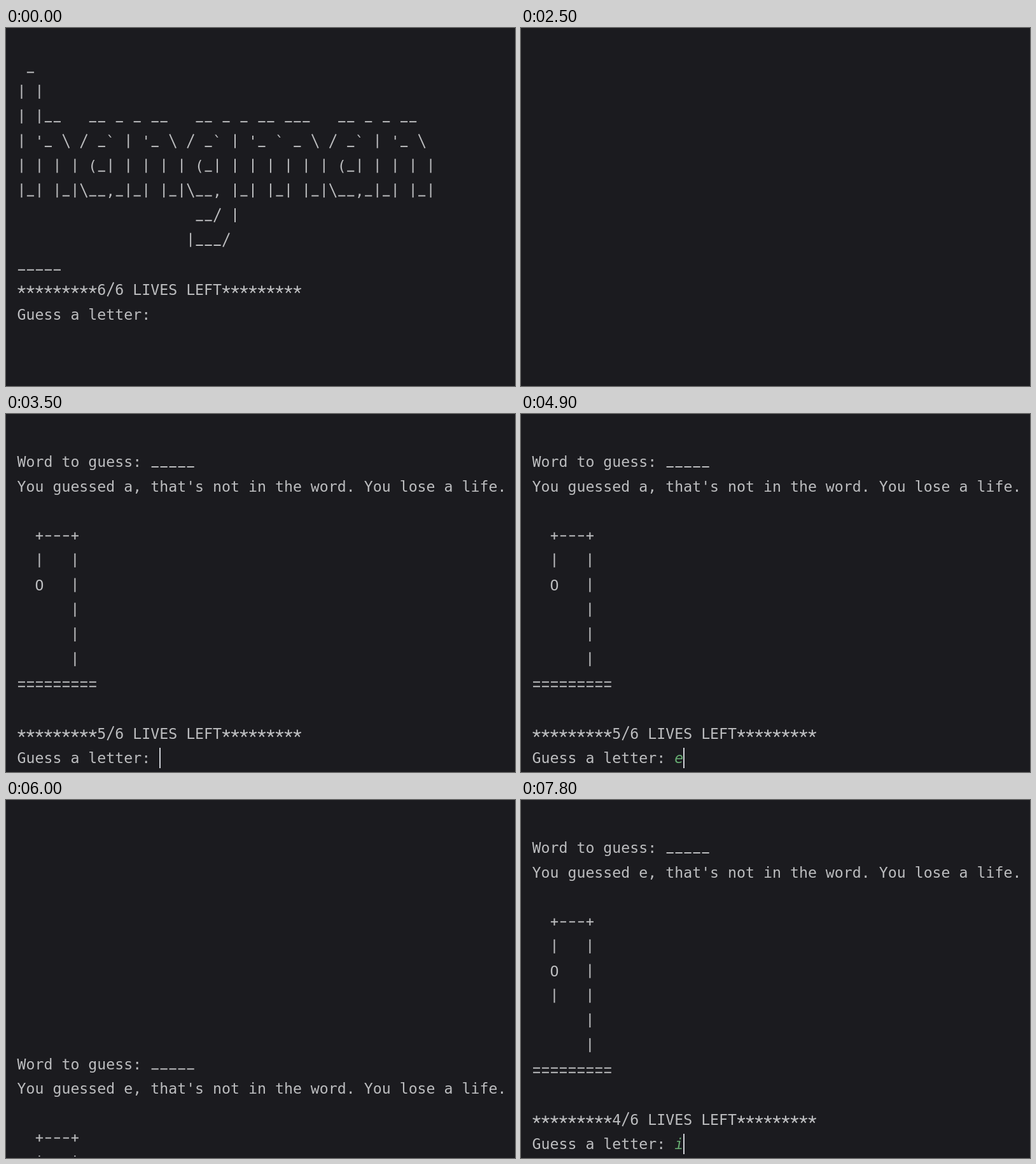
An HTML page with a canvas for the animation above (8000 ms loop, 800 px wide and 562 px high).

```html
<!DOCTYPE html>
<html lang="en">
<head>
<meta charset="utf-8">
<title>Hangman</title>
<style>
html, body { margin: 0; width: 100%; height: 100%; overflow: hidden; background: #1b1b1f; }
canvas { display: block; }
</style>
</head>
<body>
<canvas width="800" height="562"></canvas>
<pre id="art" hidden>
 _
| |
| |__   __ _ _ __   __ _ _ __ ___   __ _ _ __
| '_ \ / _` | '_ \ / _` | '_ ` _ \ / _` | '_ \
| | | | (_| | | | | (_| | | | | | | (_| | | | |
|_| |_|\__,_|_| |_|\__, |_| |_| |_|\__,_|_| |_|
                    __/ |
                   |___/
_____</pre>
<script>
const ctx = document.querySelector('canvas').getContext('2d');
const LEFT = 17.5, CELL = 13.98, ROW = 38.77, LOOP = 8000;
const FONT = '23.2px "DejaVu Sans Mono", monospace';
const GREY = '#bcbdbf', GREEN = '#65a970', CARET = '#ced0d6';

// Line-drawn characters, relative to the centre of their cell
const strokes = {
  '|': 'M0-11V11',
  '_': 'M-5.6 8.3H5.6',
  '/': 'M4.9-11L-4.9 11',
  '\\': 'M-4.9-11L4.9 11',
  '-': 'M-4.6.3H4.6',
  '+': 'M-5.6.3H5.6M0-5.3V5.9',
  '=': 'M-5.5-3H5.5M-5.5 4H5.5',
  '*': 'M0 .5V-5.7M0 .5L5.9-1.4M0 .5L-5.9-1.4M0 .5L3.6 5.5M0 .5L-3.6 5.5'
};
for (const c in strokes) strokes[c] = new Path2D(strokes[c]);

const prompt = lives => [`*********${lives}/6 LIVES LEFT*********`, 'Guess a letter: '];
const round = (letter, lives, body) => [
  'Word to guess: _____',
  `You guessed ${letter}, that's not in the word. You lose a life.`,
  '',
  '  +---+',
  '  |   |',
  '  O   |',
  `  ${body}   |`,
  '      |',
  '      |',
  '=========',
  '',
  ...prompt(lives)
];

const intro = [...document.getElementById('art').textContent.split('\n'), ...prompt(6)];
const second = round('a', 5, ' ');
const third = round('e', 4, '|');
const INTRO_Y = 61.3, LOW_Y = 414, TOP_Y = 74.7;
const OFF = 0, INLINE = 1, BELOW = 2;

// start time, lines, centre of the first row, typed letter, caret
const states = [
  [0, intro, INTRO_Y, '', OFF],
  [100, intro, INTRO_Y, '', INLINE],
  [700, intro, INTRO_Y, '', OFF],
  [1300, intro, INTRO_Y, '', INLINE],
  [1400, intro, INTRO_Y, 'ɑ', INLINE],
  [2000, intro, INTRO_Y, 'ɑ', OFF],
  [2300, intro, INTRO_Y, 'ɑ', BELOW],
  [2500, [], 0, '', OFF],
  [2600, second, LOW_Y, '', OFF],
  [2700, second, TOP_Y, '', INLINE],
  [3900, second, TOP_Y, '', OFF],
  [4500, second, TOP_Y, '', INLINE],
  [4600, second, TOP_Y, 'e', INLINE],
  [5700, second, TOP_Y - ROW, 'e', BELOW],
  [6000, third, LOW_Y, '', OFF],
  [6100, third, TOP_Y, '', INLINE],
  [7000, third, TOP_Y, '', OFF],
  [7600, third, TOP_Y, '', INLINE],
  [7800, third, TOP_Y, 'i', INLINE]
];

function drawChar(c, col, y) {
  const x = LEFT + (col + .5) * CELL;
  if (!strokes[c]) return ctx.fillText(c, x, y + 8.5);
  ctx.save();
  ctx.translate(x, y);
  ctx.stroke(strokes[c]);
  ctx.restore();
}

function draw([, lines, top, typed, caret]) {
  ctx.fillStyle = '#1b1b1f';
  ctx.fillRect(0, 0, 800, 562);
  ctx.save();
  ctx.beginPath();
  ctx.rect(0, 0, 800, 560);
  ctx.clip();
  ctx.textAlign = 'center';
  ctx.lineWidth = 2;
  ctx.fillStyle = ctx.strokeStyle = GREY;
  ctx.font = FONT;
  lines.forEach((line, row) =>
    [...line].forEach((c, col) => c !== ' ' && drawChar(c, col, top + row * ROW)));

  const last = top + (lines.length - 1) * ROW;
  if (typed) {
    ctx.fillStyle = GREEN;
    ctx.font = 'italic ' + FONT;
    drawChar(typed, 16, last);
  }
  if (caret) {
    const col = caret === BELOW ? 0 : 16 + typed.length;
    const y = caret === BELOW ? last + ROW : last;
    ctx.fillStyle = CARET;
    ctx.fillRect(Math.round(LEFT + col * CELL), Math.round(y - 16), 2, 32);
  }
  ctx.restore();
}

const start = performance.now();
function tick() {
  const t = (performance.now() - start) % LOOP;
  draw(states.findLast(s => s[0] <= t));
  requestAnimationFrame(tick);
}
tick();
</script>
</body>
</html>
```
